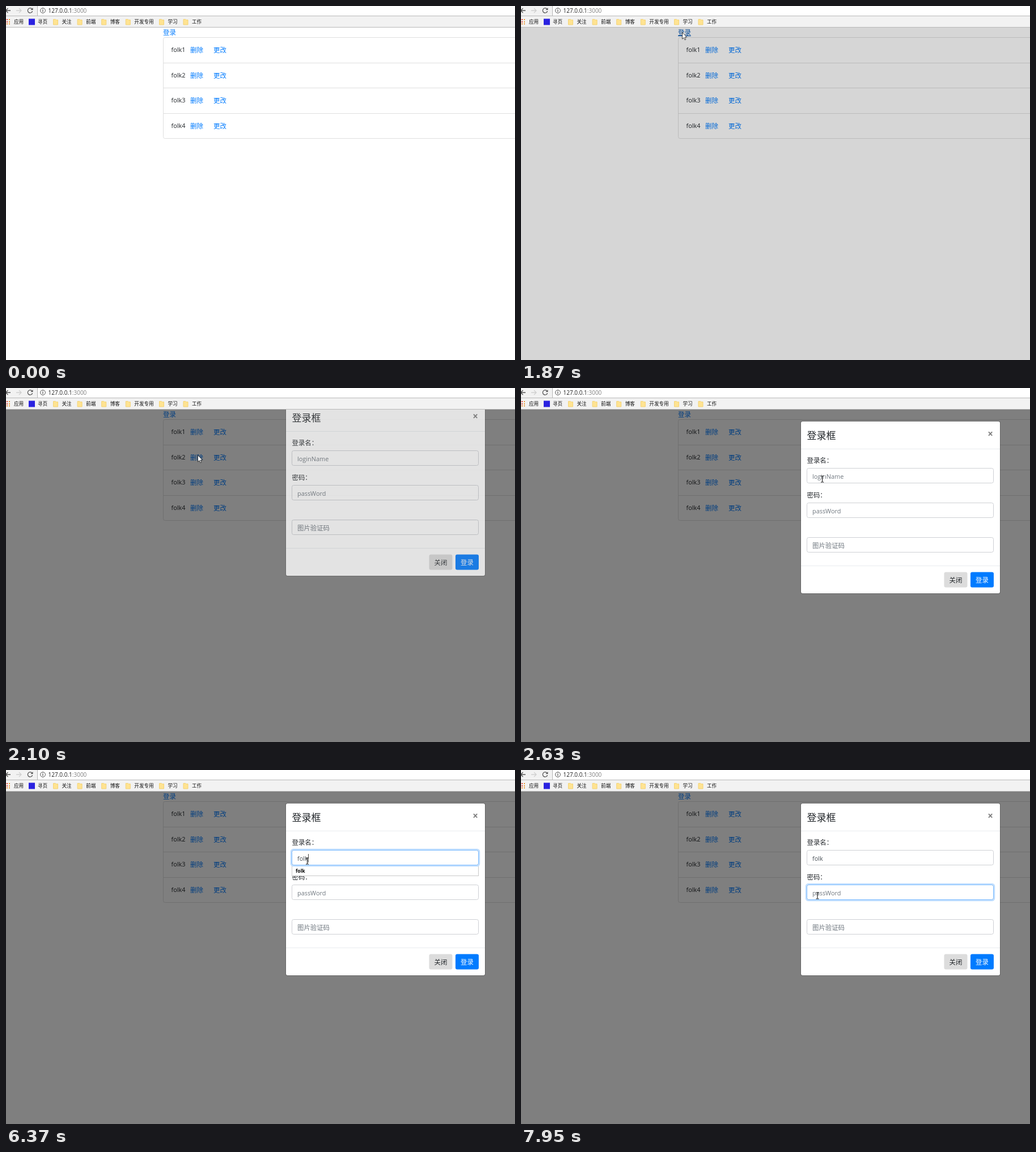
Write an HTML page that moves like this. It is 898 px wide and 624 px high and loops after 8 s.

```html
<!DOCTYPE html>
<html lang="zh-CN">
<head>
<meta charset="utf-8">
<title>登录框</title>
<style>
html, body { margin: 0; width: 100%; height: 100%; overflow: hidden; background: #fff; }
svg { display: block; width: 898px; height: 624px; }
text { font: 11.4px "Open Sans", "Noto Sans CJK SC", "Noto Sans CJK", sans-serif; fill: #212529; white-space: pre; }
.link { fill: #007bff; }
.hover { fill: #0056b3; text-decoration: underline; }
.latin { font-size: 10.9px; }
.hint { fill: #6f777f; }
.cjk { font-size: 11.4px; }
.value { fill: #495057; }
.mark { font-size: 8.6px; fill: #111; }
.url { font-size: 10px; fill: #222; }
.title { font-size: 17px; }
.close { font-size: 17px; font-weight: 700; fill: #7f7f7f; text-anchor: middle; }
.option { font-size: 8.6px; font-weight: 700; fill: #000; }
.light { fill: #fff; }
.icon { fill: none; stroke: #555; stroke-width: 1.3; }
</style>
</head>
<body>
<svg id="stage" viewBox="0 0 898 624"></svg>
<script>
const LOOP = 8000;
const stage = document.getElementById('stage');
const $ = id => document.getElementById(id);

const text = (x, y, s, cls = '', id = '') => `<text x="${x}" y="${y}" class="${cls}" id="${id}">${s}</text>`;
const rect = (x, y, w, h, fill, more = '') => `<rect x="${x}" y="${y}" width="${w}" height="${h}" fill="${fill}" ${more}/>`;
const path = (d, more = 'class="icon"') => `<path d="${d}" ${more}/>`;

function row(n) {
  const y = 55.5 + 44.6 * (n - 1);
  const line = n > 1 ? rect(277, Math.round(y - .5), 640, 1, '#dfdfdf') : '';
  return line + text(291.5, y + 25.5, 'folk' + n, 'latin') +
    text(325, y + 26.5, '删除', 'link') + text(366, y + 26.5, '更改', 'link');
}

function folder(x, name) {
  return path(`M${x + .5} 23.5h4l1 1h3v8.5h-8z`, 'fill="#ffe391" stroke="#f3d377"') + text(x + 15.5, 31, name, 'mark');
}

function field(y, hint, cls) {
  return rect(504.5, y, 329, 26, '#fff', 'rx="3" stroke="#ced0d4"') + text(514, y + 18, hint, 'hint ' + cls);
}

const ring = (y, id) => `<g id="${id}">` +
  rect(502.9, y - 1.6, 332.2, 29.2, 'none', 'rx="4" stroke="#bfdeff" stroke-width="2.3"') +
  rect(504.5, y, 329, 26, 'none', 'rx="3" stroke="#80bdff"') + '</g>';

const page = rect(0, 38, 898, 586, '#fff') +
  text(277, 51, '登录', 'link', 'login') +
  rect(277.5, 55.5, 640, 178, 'none', 'rx="3" stroke="#dfdfdf"') +
  [1, 2, 3, 4].map(row).join('') +
  rect(0, 38, 898, 586, '#000', 'id="shade"');

const modal = '<g id="modal">' +
  rect(493, 58, 353, 305, '#000', 'rx="4" fill-opacity=".2"') +
  rect(494, 59, 351, 303, '#fff', 'rx="3"') +
  text(504.5, 90, '登录框', 'title') + text(828, 87, '×', 'close') +
  rect(494, 107, 351, 1, '#e9ecef') +
  text(504.5, 132, '登录名：') + text(504.5, 192.8, '密码：') +
  '<g id="menu">' + rect(504.5, 168.5, 329, 18, '#fff', 'stroke="#c9c9c9"') + text(511, 181, 'folk', 'option') + '</g>' +
  field(141.5, '<tspan id="loginHint">loginName</tspan>', 'latin') +
  field(202.5, 'passWord', 'latin') + field(263.5, '图片验证码', 'cjk') +
  ring(141.5, 'loginRing') + ring(202.5, 'passRing') +
  text(514, 159.5, '', 'value latin', 'typed') +
  rect(514, 148, 1, 15, '#444', 'id="caret"') +
  rect(494, 313, 351, 1, '#e9ecef') +
  rect(746.5, 324.5, 41, 27, '#dcdcdc', 'rx="3"') + text(755.5, 342.5, '关闭') +
  rect(793, 324.5, 41, 27, '#007bff', 'rx="3"') + text(802, 342.5, '登录', 'light') +
  '</g>';

const dots = [24, 28, 31.5].map((y, i) =>
  rect(1, y - 1, 2, 2, ['#e0483e', '#e0483e', '#e8862f'][i]) + rect(5, y - 1, 2, 2, '#eb9a34')).join('');

const chrome = rect(0, 0, 898, 17, '#fff') + rect(0, 0, 55, 17, '#f2f2f2') +
  rect(55, 0, 1, 17, '#b5b5b5') + rect(0, 17, 898, 1, '#b9b9b9') +
  rect(0, 18, 898, 19, '#f2f2f2') + rect(0, 37, 898, 1, '#b9b9b9') +
  path('M8 8H0M3.5 4 -.5 8 3.5 12') +
  path('M18 8h9M23 4l4 4-4 4', 'fill="none" stroke="#d0d0d0" stroke-width="1.3"') +
  path('M46 5.5A4.2 4.2 0 1 0 46.6 9') + path('M47.5 3v4h-4z', 'fill="#555"') +
  '<circle class="icon" cx="65" cy="8" r="4.4" style="stroke-width:1"/>' +
  path('M65 7v3.5M65 5v1.2') +
  text(74.5, 11.5, '127.0.0.1<tspan fill="#808080">:3000</tspan>', 'url') +
  dots + text(14, 31, '应用', 'mark') +
  rect(40, 22.5, 11, 11, '#2a22e0') + text(56, 31, '寻页', 'mark') +
  ['关注', '前端', '博客', '开发专用'].map((s, i) => folder(83 + 42.6 * i, s)).join('') +
  folder(270, '学习') + folder(312.5, '工作');

const pointers = path('M0 0V11.6L2.7 9.2 4.5 13.3 6.3 12.5 4.5 8.5H8Z', 'id="arrow" fill="#fff" stroke="#000" stroke-width=".7"') +
  path('M-2.5-5.5H-.6L0-5 .6-5.5H2.5M0-5V5M-2.5 5.5H-.6L0 5 .6 5.5H2.5', 'id="beam" fill="none" stroke="#000"');

stage.innerHTML = page + modal + chrome + pointers;

const refreshes = [[0], [160], [330, 720, 6], [1030, 1630, 9], [1800, 2570, 11], [2630], [2860, 2950, 2],
  [3410], [3720], [3970], [4200], [4340], [4890], [5130], [5360], [5910], [6370],
  [6830, 7240, 6], [7430, 7560, 3], [7950]]
  .flatMap(([a, b, n = 1]) => Array.from({ length: n }, (_, i) =>
    i ? Math.floor((a + (b - a) * i / (n - 1)) / 10) * 10 : a));

const mouse = [[160, 746, 593], [252, 746, 593], [330, 772, 560], [720, 414, 219], [955, 414, 219],
  [1630, 284.5, 46.5], [1870, 284.5, 46.5], [2100, 338.5, 118.5], [2490, 525, 163], [2570, 529.5, 162],
  [2630, 531.5, 160.5], [6800, 531.5, 160.5], [7240, 523, 221.5], [LOOP, 523, 221.5]];

const typing = [[0, ''], [3720, 'f'], [3970, 'fo'], [4200, 'fol'], [4340, 'foll'], [5130, 'fol'], [5360, 'folk']];
const caretOn = [[2860, 3410], [3720, 4890], [5360, 5910], [6370, 6830], [7430, 7950]];
const menuOn = [[3720, 4340], [5130, 7430]];

const last = (list, t, key = v => v) => list.filter(v => key(v) <= t).pop();
const within = (spans, t) => spans.some(([a, b]) => t >= a && t < b);
const ramp = (t, start, length) => Math.min(1, Math.max(0, (t - start) / length));
const show = (id, on) => $(id).style.display = on ? '' : 'none';

function mouseAt(t) {
  const i = Math.max(1, mouse.findIndex(k => k[0] >= t));
  const [a, b] = [mouse[i - 1], mouse[i]];
  const p = ramp(t, a[0], b[0] - a[0]);
  return [a[1] + (b[1] - a[1]) * p, a[2] + (b[2] - a[2]) * p];
}

function draw(now) {
  const t = last(refreshes, now % LOOP);
  const [x, y] = mouseAt(t);

  $('login').setAttribute('class', t < 1950 && x < 300 && y < 54 ? 'link hover' : 'link');
  $('shade').style.opacity = ramp(t, 1822, 150) / 2;

  const slide = Math.round(76 * (1 - ramp(t, 1983, 300)) ** 1.8);
  $('modal').setAttribute('transform', `translate(0 ${-slide})`);
  $('modal').style.opacity = ramp(t, 1983, 150);

  const switched = ramp(t, 7390, 150);
  $('loginRing').style.opacity = ramp(t, 2800, 150) - switched;
  $('passRing').style.opacity = switched;

  const word = last(typing, t, v => v[0])[1];
  $('typed').textContent = word;
  show('loginHint', !word);
  show('menu', within(menuOn, t));

  const second = t >= 7430;
  show('caret', within(caretOn, t));
  $('caret').setAttribute('x', second || !word ? 514 : Math.round(514 + $('typed').getComputedTextLength()));
  $('caret').setAttribute('y', second ? 209 : 148);

  const overField = t > 2400 && x > 504 && (y > 141 && y < 168 || y > 202 && y < 229);
  show('arrow', t >= 160 && !overField);
  show('beam', overField);
  for (const id of ['arrow', 'beam']) $(id).setAttribute('transform', `translate(${x} ${y})`);
}

const start = performance.now();
function tick() {
  draw(performance.now() - start);
  requestAnimationFrame(tick);
}
tick();
</script>
</body>
</html>
```
